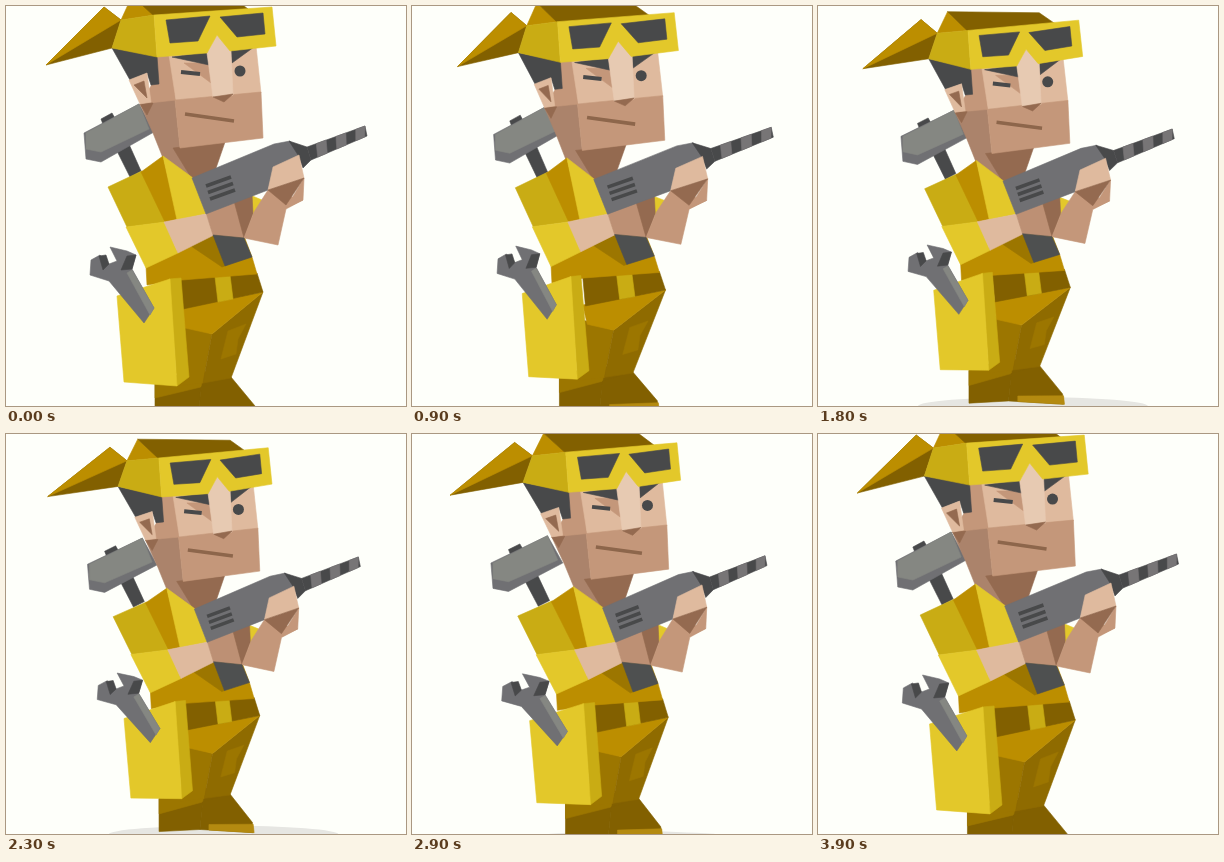
An HTML page with a canvas for the animation above (4 s loop, 400 by 400 pixels).

```html
<!DOCTYPE html>
<html lang="en">
<head>
<meta charset="utf-8">
<style>
  html, body { margin: 0; width: 100%; height: 100%; overflow: hidden; background: #fefffa; }
  canvas { display: block; }
</style>
</head>
<body>
<canvas id="stage" width="400" height="400"></canvas>
<script>
const ctx = document.getElementById('stage').getContext('2d');
const LOOP = 4000, STEP = 100;

const BRIGHT = '#e3c82a', GOLD = '#c9ac14', OCHRE = '#bc8e00', OLIVE = '#9c7600', UMBER = '#826000';
const DARK = '#48494a', GREY = '#707073', SILVER = '#858782';
const PALE = '#e7cab2', SKIN = '#dfba9e', TAN = '#c4977a', SHADE = '#ab836b', BROWN = '#946a50';

// Depth towards the viewer, as a function of x, for each part of the figure.
const ridge = (peak, mid, slope) => x => peak - slope * Math.abs(x - mid);
const head = x => 4.4 - ((x - 185) / 50) ** 2;
const body = ridge(4.6, 190, .043);
const hammer = ridge(3.1, 190, .043);
const pocket = ridge(6.8, 175, .055);

// The camera circles: it swings sideways while it moves back and forth.
const camera = { swing: 0, dolly: 0 };
function project([x, y, z]) {
  const zoom = .026 * (1 + .13 * z) * camera.dolly;
  return [x + (x - 190) * zoom - z * camera.swing, y + (y - 212) * zoom];
}

const scene = [];
const vertices = (depth, text) => text.split(' ').map(pair => {
  const [x, y] = pair.split(',').map(Number);
  return [x, y, depth(x)];
});

function trace(points) {
  ctx.beginPath();
  points.forEach(p => ctx.lineTo(...p));
}

function fill(color, points) {
  trace(points);
  ctx.closePath();
  ctx.fillStyle = ctx.strokeStyle = color;
  ctx.lineWidth = .6;
  ctx.fill();
  ctx.stroke();
}

function poly(depth, color, text) {
  const verts = vertices(depth, text);
  scene.push(() => fill(color, verts.map(project)));
}

function line(depth, color, width, text) {
  const verts = vertices(depth, text);
  scene.push(() => {
    trace(verts.map(project));
    ctx.strokeStyle = color;
    ctx.lineWidth = width;
    ctx.stroke();
  });
}

function oval(depth, color, center, rx, ry) {
  const [mid] = vertices(depth, center);
  scene.push(() => {
    ctx.beginPath();
    ctx.ellipse(...project(mid), rx, ry, 0, 0, 2 * Math.PI);
    ctx.fillStyle = color;
    ctx.fill();
  });
}

function drillBit() {
  const corners = vertices(body, '301,141 359,120 361,130 305,154');
  const mix = (p, q, k) => p.map((v, i) => v + (q[i] - v) * k);
  scene.push(() => {
    const [a, b, c, d] = corners.map(project);
    fill(DARK, [a, b, c, d]);
    for (let k = .16; k < 1; k += .34) {
      const end = Math.min(k + .17, 1);
      fill('#777576', [mix(a, b, k), mix(a, b, end), mix(d, c, end - .04), mix(d, c, k - .04)]);
    }
  });
}

oval(body, '#e6e6e2', '218,415', 115, 9);

// Hammer
poly(hammer, DARK, '95,113 106,107 111,116 98,121');
poly(hammer, DARK, '110,143 122,136 135,165 124,171');
poly(hammer, GREY, '78,127 133,98 148,126 95,156 80,153');
poly(hammer, SILVER, '80,127 133,98 143,123 95,146 80,143');

// Legs
poly(body, UMBER, '149,372 200,366 225,371 195,385 192,411 149,411');
poly(body, OLIVE, '149,376 197,370 195,381 149,392');
poly(body, UMBER, '195,381 225,371 249,400 250,411 192,411');
poly(body, '#b48a10', '202,405 250,402 251,411 202,411');
poly(body, OLIVE, '176,318 206,328 197,377 171,380');
poly(body, '#8f6b00', '206,328 257,286 225,372 197,377');
poly(body, OLIVE, '222,325 240,318 232,333 230,348 215,353');
poly(body, OCHRE, '174,302 257,286 206,328 179,322');
poly(body, UMBER, '174,272 251,267 257,286 177,303');
poly(body, GOLD, '209,271 224,269 227,293 212,296');

// Torso
poly(body, OCHRE, '140,260 171,244 207,227 238,230 246,251 251,268 176,274 141,279');
poly(body, OLIVE, '207,228 185,240 216,261 219,260');
poly(body, BRIGHT, '244,189 256,194 247,210');

// Head
poly(head, SHADE, '134,98 169,93 174,142 209,163 186,174 157,152 147,127');
poly(head, BROWN, '167,142 219,136 209,165 186,173');
poly(head, TAN, '151,50 166,49 170,94 134,98 145,80');
poly(head, SKIN, '163,49 250,40 255,87 170,94');
poly(head, TAN, '169,94 255,86 257,132 174,142');
poly(head, BROWN, '134,98 147,97 141,109');
poly(head, DARK, '106,42 151,50 153,78 145,79 141,67 124,74');
poly(head, SKIN, '123,74 141,67 145,96 134,98');
poly(head, BROWN, '128,79 138,75 141,92');
poly(head, TAN, '178,57 203,57 205,77');
poly(head, DARK, '166,51 201,46 203,59');
poly(head, DARK, '224,44 248,41 226,57');
poly(head, PALE, '211,29 225,44 227,89 207,91 201,47');
poly(head, BROWN, '207,91 227,88 218,96');
line(head, DARK, 4, '175,66 194,68');
oval(head, DARK, '234,65', 5.5, 5.5);
line(head, '#8d664b', 3.6, '179,108 228,115');

// Bandana and goggles
poly(head, UMBER, '40,59 98,1 115,14 106,42');
poly(head, OCHRE, '40,59 98,1 115,14');
poly(head, OCHRE, '115,14 126,-10 148,9');
poly(head, UMBER, '126,-10 225,-10 242,3 148,10');
poly(head, GOLD, '106,42 115,14 148,9 151,51');
poly(head, BRIGHT, '148,9 266,1 270,40 224,45 211,29 201,47 151,51');
poly(head, DARK, '160,14 204,10 192,35 164,37');
poly(head, DARK, '214,11 257,7 259,28 231,31');

// Sleeve and arms
poly(body, GOLD, '102,181 136,165 160,216 121,221');
poly(body, OCHRE, '135,166 157,150 172,213 159,216');
poly(body, BRIGHT, '157,150 187,172 200,208 171,214');
poly(body, BRIGHT, '120,221 159,216 172,247 140,262');
poly(body, SKIN, '158,216 200,208 208,229 172,247');
poly(body, '#bd9074', '200,207 232,194 246,210 238,232 207,229');
poly(body, BROWN, '228,195 246,188 247,208 238,232');
poly(body, TAN, '248,206 262,184 297,194 280,203 272,239 238,232');

// Drill
poly(body, '#4e5050', '207,229 238,232 246,251 219,260');
poly(body, GREY, '186,172 268,138 284,135 294,151 268,162 262,184 200,208');
drillBit();
poly(body, DARK, '283,135 301,141 305,154 297,162 292,149');
for (let i = 0; i < 3; i++) {
  line(body, DARK, 3.6, `${200 + 2 * i},${180 + 6.5 * i} ${225 + 2 * i},${171 + 6.5 * i}`);
}
poly(body, SKIN, '267,161 293,149 298,172 262,184');
poly(body, TAN, '298,172 297,194 280,202');
poly(body, BROWN, '262,184 298,172 280,199');

// Pocket and wrench
poly(pocket, GOLD, '163,273 175,272 183,371 171,380');
poly(pocket, BRIGHT, '111,290 164,273 171,380 118,376');
poly(pocket, GREY, '84,269 85,254 94,249 103,258 111,255 104,241 121,245 130,249 126,263 148,302 138,317 103,275');
poly(pocket, DARK, '93,250 100,249 103,258 97,264');
poly(pocket, DARK, '121,250 130,249 126,263 115,264');
poly(pocket, SILVER, '126,264 148,302 144,309 121,267');

function draw(now) {
  const time = Math.floor(now % LOOP / STEP) * STEP;
  const angle = time / LOOP * 2 * Math.PI;
  camera.swing = Math.sin(angle);
  camera.dolly = Math.cos(angle) - 1;
  ctx.fillStyle = '#fefffa';
  ctx.fillRect(0, 0, 400, 400);
  ctx.lineJoin = 'round';
  scene.forEach(paint => paint());
  requestAnimationFrame(draw);
}
draw(performance.now());
</script>
</body>
</html>
```
